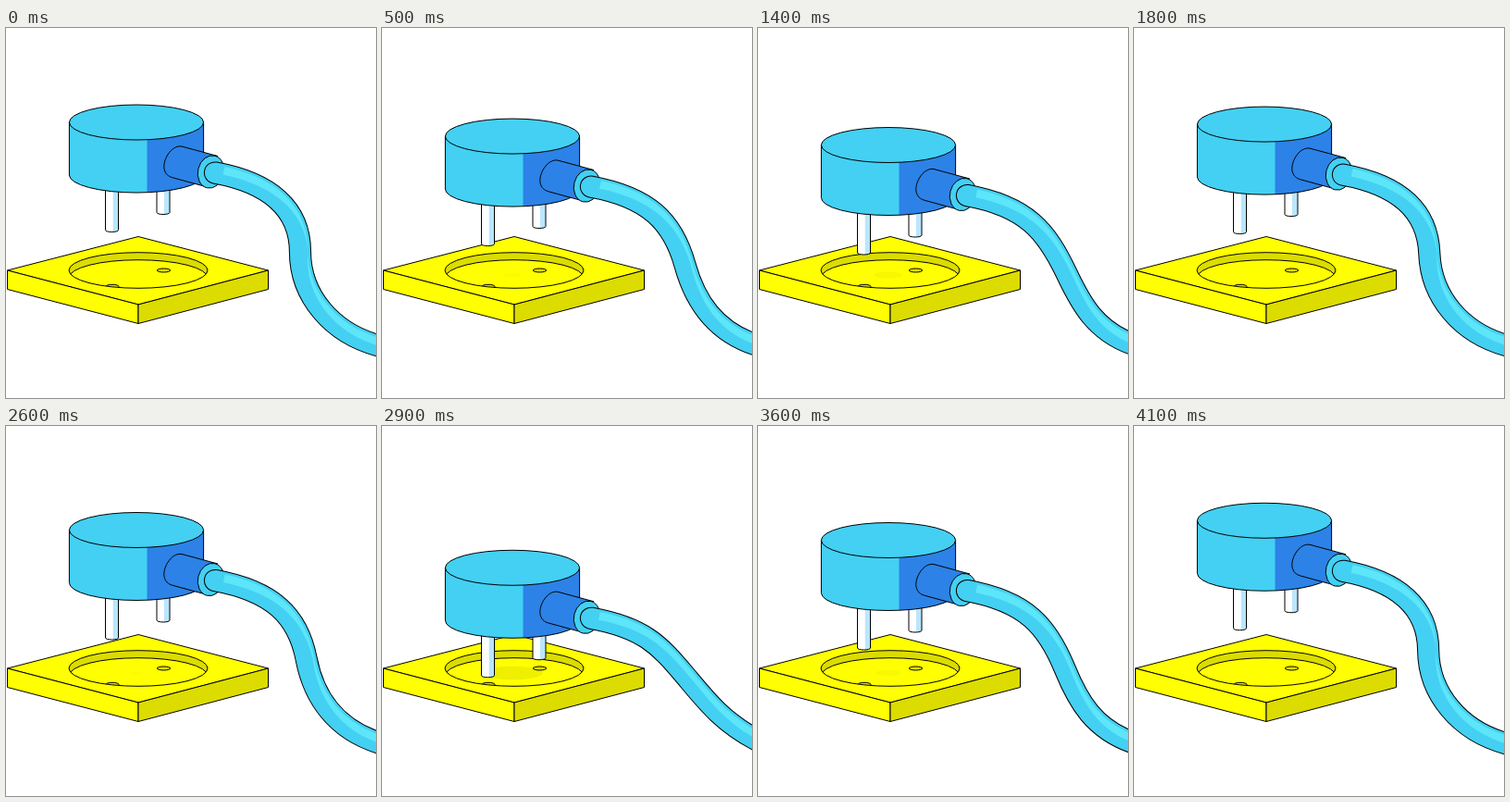
An HTML page with a canvas for the animation above (4200 ms loop, 400 by 400 pixels).

```html
<!DOCTYPE html>
<html>
<head>
<meta charset="utf-8">
<title>Plug and socket</title>
<style>
html, body { margin: 0; width: 100%; height: 100%; overflow: hidden; background: #fff; }
canvas { display: block; width: 400px; height: 400px; }
</style>
</head>
<body>
<canvas id="stage" width="400" height="400"></canvas>
<script>
const ctx = document.getElementById('stage').getContext('2d');
const LOOP = 4200, STEP = 100;
const FIRST_PUSH = 1000, SECOND_PUSH = 3175, FLOOR_DEPTH = 111;
const CYAN = '#43d0f3', LIGHT = '#5de6f9', BLUE = '#2c82e6';
const YELLOW = '#ffff00', OLIVE = '#dcdc00', INK = '#000';

// Middle of the cable, its direction there and at the far end, by plug depth
const BENDS = [
  { depth: 0, x: 318, y: 242, lean: 1.57, end: 0.25 },
  { depth: 25, x: 334, y: 266, lean: 1.12, end: 0.35 },
  { depth: 75, x: 322, y: 273, lean: 0.65, end: 0.62 },
  { depth: 105, x: 320, y: 296, lean: 0.52, end: 0.2 }
];

// Slow approach, then a quick thrust down to the socket floor
function depthAt(t) {
  const gap = Math.min(Math.abs(t - FIRST_PUSH), Math.abs(t - SECOND_PUSH)) / 1000;
  const approach = 66 * Math.max(0, 1 - gap) ** 2.15;
  const thrust = 53 * Math.exp(-((gap / 0.2686) ** 2.8));
  return Math.min(FLOOR_DEPTH, approach + thrust);
}

function paint(fill, stroke = INK) {
  if (fill) { ctx.fillStyle = fill; ctx.fill(); }
  if (stroke) { ctx.strokeStyle = stroke; ctx.stroke(); }
}

function polygon(points, fill, stroke) {
  ctx.beginPath();
  points.forEach(([x, y]) => ctx.lineTo(x, y));
  ctx.closePath();
  paint(fill, stroke);
}

function ellipse(x, y, rx, ry, fill, stroke, turn = 0) {
  ctx.beginPath();
  ctx.ellipse(x, y, rx, ry, turn, 0, Math.PI * 2);
  paint(fill, stroke);
}

function traceRim(end = Math.PI * 2) {
  ctx.ellipse(143, 262, 75, 19.3, 0, 0, end);
}

function drawSocket(depth) {
  const left = [1.5, 262], right = [283.5, 262], front = [143, 299];
  const lower = ([x, y]) => [x, y + 20.5];
  polygon([left, [143, 225.5], right, front], YELLOW);
  polygon([left, front, lower(front), lower(left)], YELLOW);
  polygon([front, right, lower(right), lower(front)], OLIVE);
  ctx.save();
  ctx.beginPath();
  traceRim();
  ctx.fillStyle = OLIVE;
  ctx.fill();
  ctx.clip();
  ellipse(143, 270, 75, 19.3, YELLOW);
  ctx.globalAlpha = depth / FLOOR_DEPTH;
  ellipse(141, 267, 0.64 * depth, 0.14 * depth, OLIVE, null);
  ctx.globalAlpha = 1;
  ellipse(115, 279.5, 7, 2.2, OLIVE);
  ellipse(170.5, 262, 7.2, 2, OLIVE);
  ctx.restore();
  ctx.beginPath();
  traceRim();
  paint(null);
}

function drawPin(x, bottom, depth, floor) {
  const end = Math.min(bottom + depth, floor) - 2, top = 165 + depth;
  if (end <= top) return;
  ctx.beginPath();
  ctx.moveTo(x - 7, top);
  ctx.lineTo(x - 7, end);
  ctx.ellipse(x, end, 7, 2, 0, Math.PI, 0, true);
  ctx.lineTo(x + 7, top);
  const fill = ctx.createLinearGradient(x - 7, 0, x + 7, 0);
  fill.addColorStop(0.56, '#fff');
  fill.addColorStop(0.6, '#b9e6ff');
  paint(fill);
}

function drawBody(depth) {
  const top = 102 + depth, base = 159 + depth;
  ctx.beginPath();
  ctx.moveTo(68.4, top);
  ctx.lineTo(68.4, base);
  ctx.ellipse(141, base, 72.6, 19, 0, Math.PI, 0, true);
  ctx.lineTo(213.6, top);
  ctx.closePath();
  ctx.save();
  ctx.clip();
  ctx.fillStyle = CYAN;
  ctx.fillRect(60, top, 160, 90);
  ctx.fillStyle = BLUE;
  ctx.fillRect(152.5, top, 70, 90);
  ctx.restore();
  paint(null);
  ellipse(141, top, 72.6, 19, CYAN);
}

function drawSleeve(depth) {
  ctx.save();
  ctx.translate(0, depth);
  ctx.beginPath();
  ctx.moveTo(229, 138.5);
  ctx.lineTo(190, 128);
  ctx.bezierCurveTo(178, 126, 168, 145, 171.5, 154);
  ctx.bezierCurveTo(173, 159, 177, 161, 181, 162);
  ctx.lineTo(214, 171);
  paint(BLUE);
  ellipse(221.5, 155.5, 14, 17.8, CYAN, INK, 0.24);
  ctx.restore();
}

function bendAt(depth) {
  const next = Math.max(1, BENDS.findIndex(b => b.depth >= depth));
  const i = depth > BENDS[BENDS.length - 1].depth ? BENDS.length - 1 : next;
  const a = BENDS[i - 1], b = BENDS[i];
  const u = (depth - a.depth) / (b.depth - a.depth);
  const mix = key => a[key] + (b[key] - a[key]) * u;
  return { x: mix('x'), y: mix('y'), lean: mix('lean'), end: mix('end') };
}

// Four control points leaving a and reaching b at the given angles
function arc(a, angleA, pullA, b, angleB, pullB) {
  const span = Math.hypot(b.x - a.x, b.y - a.y);
  const along = (p, angle, pull) => ({
    x: p.x + Math.cos(angle) * pull * span,
    y: p.y + Math.sin(angle) * pull * span
  });
  return [a, along(a, angleA, pullA), along(b, angleB, -pullB), b];
}

function pointOn([a, b, c, d], u) {
  const v = 1 - u;
  const pos = k => v * v * v * a[k] + 3 * v * v * u * b[k] + 3 * v * u * u * c[k] + u * u * u * d[k];
  const vel = k => v * v * (b[k] - a[k]) + 2 * v * u * (c[k] - b[k]) + u * u * (d[k] - c[k]);
  const dx = vel('x'), dy = vel('y'), len = Math.hypot(dx, dy);
  return { x: pos('x'), y: pos('y'), tx: dx / len, ty: dy / len };
}

// The gleam thins out towards the edge where the cable hangs straight down
function drawGleam(arcs) {
  const upper = [], lower = [];
  for (let i = 1; i <= 40; i++) {
    const u = i / 20;
    const { x, y, tx, ty } = u <= 1 ? pointOn(arcs[0], u) : pointOn(arcs[1], u - 1);
    const side = d => [x + ty * d, y - tx * d];
    upper.push(side(8.5));
    lower.unshift(side(8.5 - 9 * Math.max(0, tx)));
  }
  polygon([...upper, ...lower], LIGHT, null);
}

function drawCable(depth) {
  const start = { x: 226, y: 156.5 + depth };
  const end = { x: 405, y: 344 - 0.09 * depth };
  const bend = bendAt(depth);
  const arcs = [
    arc(start, 0.18, 0.48, bend, bend.lean, 0.37),
    arc(bend, bend.lean, 0.35, end, bend.end, 0.41)
  ];
  ctx.save();
  ctx.lineCap = 'round';
  ctx.beginPath();
  ctx.moveTo(start.x, start.y);
  for (const [, b, c, d] of arcs) ctx.bezierCurveTo(b.x, b.y, c.x, c.y, d.x, d.y);
  for (const [width, color] of [[24.2, INK], [22.2, CYAN]]) {
    ctx.lineWidth = width;
    paint(null, color);
  }
  ctx.restore();
  drawGleam(arcs);
}

function drawPlug(depth) {
  // The front rim of the socket hides whatever sinks below it
  ctx.save();
  ctx.beginPath();
  ctx.rect(0, 0, 400, 262);
  traceRim(Math.PI);
  ctx.clip();
  drawPin(114.5, 220.5, depth, 283);
  drawPin(170, 201.5, depth, 264);
  drawBody(depth);
  ctx.restore();
  drawSleeve(depth);
  drawCable(depth);
}

function draw() {
  const t = Math.floor((performance.now() - begin) % LOOP / STEP) * STEP;
  const depth = depthAt(t);
  ctx.fillStyle = '#fff';
  ctx.fillRect(0, 0, 400, 400);
  ctx.lineWidth = 1;
  ctx.lineJoin = 'round';
  drawSocket(depth);
  drawPlug(depth);
  requestAnimationFrame(draw);
}

const begin = performance.now();
draw();
</script>
</body>
</html>
```
